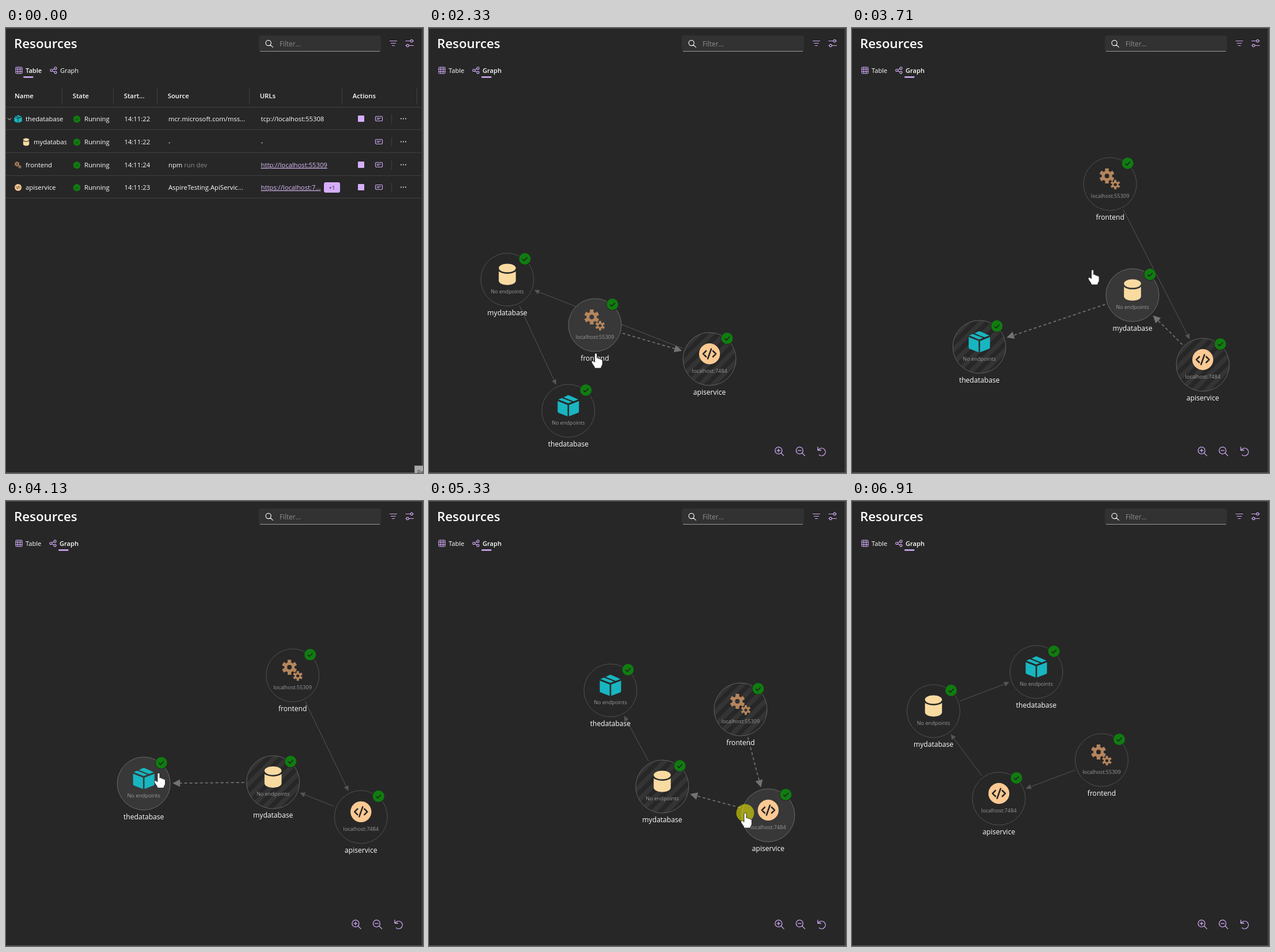
An HTML page that plays this animation: 724 by 773 pixels, repeating every 6.95 s.

```html
<!DOCTYPE html>
<html lang="en">
<head>
<meta charset="utf-8">
<title>Resources</title>
<style>
  html, body { margin: 0; width: 100%; height: 100%; overflow: hidden; background: #272727; }
  svg { display: block; width: 724px; height: 773px; font: 500 11.25px "Open Sans", "Noto Sans", sans-serif; fill: #fff; }
  .head { font-weight: 600; font-size: 11.3px; }
  .title { font-weight: 600; font-size: 22.3px; }
  .tab { font-size: 11.1px; }
  .dim { fill: #8c8c8c; font-weight: 400; }
  .url { fill: #dcbcfa; text-decoration: underline; }
  .ico { fill: none; stroke: #cfa9f5; stroke-width: 1.15; stroke-linecap: round; stroke-linejoin: round; }
  .rule { stroke: #404040; }
  .row { fill: #272727; }
  .row.hover { fill: #2c2c2c; }
  .node text { text-anchor: middle; }
  .node .name { font-size: 12.1px; }
  .node .port { font-size: 9.1px; font-weight: 400; fill: #999; }
  .ring { fill: #272727; stroke: #515151; }
  .near .ring { fill: url(#stripes); stroke: #636363; }
  .hot .ring { fill: #383838; stroke: #6a6a6a; }
  .link path { stroke: #565656; fill: none; }
  .link polygon { fill: #565656; }
  .link.on path { stroke: #737373; stroke-width: 1.7; stroke-dasharray: 5 4; }
  .link.on polygon { fill: #737373; }
</style>
</head>
<body>
<svg id="stage" viewBox="0 0 724 773" xmlns="http://www.w3.org/2000/svg"></svg>
<script>
const LOOP = 6950, SWITCH = 1173;
const ACCENT = '#d5aefb';
const stage = document.getElementById('stage');
const $ = id => document.getElementById(id);

const text = (x, y, s, cls = '', extra = '') => `<text x="${x}" y="${y}" class="${cls}" ${extra}>${s}</text>`;
const icon = (x, y, d, extra = '') => `<path class="ico" transform="translate(${x} ${y})" d="${d}" ${extra}/>`;
const use = (id, x, y, k = 1) => `<use href="#${id}" transform="translate(${x} ${y}) scale(${k})"/>`;
const disc = (x, y, r) => `M${x - r} ${y}a${r} ${r} 0 1 0 ${2 * r} 0a${r} ${r} 0 1 0 ${-2 * r} 0Z`;

function gear(cx, cy, outer, inner, hole) {
  const pts = [], step = Math.PI / 3;
  for (let i = 0; i < 6; i++) {
    for (const [da, r] of [[-.36, inner], [-.24, outer], [.24, outer], [.36, inner]]) {
      const a = i * step + da + .52;
      pts.push((cx + r * Math.cos(a)).toFixed(2) + ' ' + (cy + r * Math.sin(a)).toFixed(2));
    }
  }
  return 'M' + pts.join('L') + 'Z' + disc(cx, cy, hole);
}

const defs = `<defs>
  <pattern id="stripes" width="16" height="16" patternUnits="userSpaceOnUse" patternTransform="rotate(45)">
    <rect width="16" height="16" fill="#272727"/><rect width="8" height="16" fill="#343434"/>
  </pattern>
  <clipPath id="nameCell"><rect x="0" y="180" width="105" height="36"/></clipPath>
  <path id="db" fill="#f9dba1" transform="scale(1.85) translate(-12 -12)" d="M12 10c4.42 0 8-1.8 8-4s-3.58-4-8-4-8 1.8-8 4 3.58 4 8 4Zm6.33.17A6.9 6.9 0 0 0 20 9.05V18c0 2.2-3.58 4-8 4s-8-1.8-8-4V9.05a6.9 6.9 0 0 0 1.67 1.12C7.36 11 9.6 11.5 12 11.5c2.4 0 4.64-.5 6.33-1.33Z"/>
  <g id="box" fill="#18b6c1">
    <path d="M-18.5-8L-1.3-1.2V18.5L-17 12.4Q-18.5 11.8-18.5 10Z"/>
    <path d="M18.5-8L1.3-1.2V18.5L17 12.4Q18.5 11.8 18.5 10Z"/>
    <path d="M-17.5-10.7L-11.2-13.3 6.2-6.4 0-3.9ZM-8.3-14.5L-1.5-17.8Q0-18.6 1.5-17.8L17.5-10.7 9-7.5Z"/>
  </g>
  <path id="gears" fill="#b5855d" fill-rule="evenodd" d="${gear(-5.5, -5, 13.4, 9, 4)}${gear(9, 10, 8.6, 5.6, 2.6)}"/>
  <g id="code">
    <circle r="18.2" fill="#fdc993"/>
    <path d="M-6-5L-11 0L-6 5M6-5L11 0L6 5M3-8.5L-3 8.5" fill="none" stroke="#272727" stroke-width="2.6" stroke-linecap="round" stroke-linejoin="round"/>
  </g>
  <g id="ok">
    <circle r="10" fill="#107c10"/>
    <path d="M-4.2.3L-1.3 3.1L4.3-2.6" fill="none" stroke="#1f1f1f" stroke-width="1.5"/>
  </g>
</defs>`;

const zoom = 'M4.4-1.6a6 6 0 1 0-12 0a6 6 0 1 0 12 0M2.8 2.8L7.6 7.6M-4.4-1.6H1.2';
const header = `
  <rect width="724" height="773" fill="#272727"/>
  ${text(14, 35, 'Resources', 'title')}
  <rect x="439" y="13" width="212" height="28" rx="3.5" fill="#323232"/>
  <path d="M441 40.5H649" stroke="#9c9c9c"/>
  ${icon(457, 27, 'M3.2-1a4.6 4.6 0 1 0-9.2 0a4.6 4.6 0 1 0 9.2 0M2 2.4L6.3 6.4', 'style="stroke:#fff"')}
  ${text(475, 32, 'Filter...', 'dim', 'font-size="11.7"')}
  ${icon(672.5, 26.5, 'M-6-4H6M-4 0H4M-2 4H2')}
  ${icon(700.5, 26.5, 'M-6.5-4H1.5M6-4H7M-6.5 4H-5.5M-1 4H7' + disc(3.7, -4, 2.1) + disc(-3.2, 4, 2.1))}
  ${icon(22.5, 73.5, 'M-4-5.5H4Q5.5-5.5 5.5-4V4Q5.5 5.5 4 5.5H-4Q-5.5 5.5-5.5 4V-4Q-5.5-5.5-4-5.5M-2-5.5V5.5M2-5.5V5.5M-5.5-2H5.5M-5.5 2H5.5')}
  ${text(34, 78, 'Table', 'tab', 'id="tabTable"')}
  <g id="tabGraph">
    ${icon(82.5, 73.5, disc(-3.6, 0, 2) + disc(3.5, -3.6, 2) + disc(3.5, 3.6, 2) + 'M-1.8-.9L1.7-2.7M-1.8.9L1.7 2.7')}
    ${text(94, 78, 'Graph', 'tab')}
  </g>
  <rect id="mark" y="84" width="17.5" height="2.5" rx="1.2" fill="${ACCENT}"/>`;

const rowY = i => Math.round(158 + 39.8 * i);

function row(i, r) {
  const y = rowY(i), b = y + 4, left = r.indent || 34;
  return `<rect class="row" x="0" y="${y - 19}" width="721" height="38"/>
    ${use(r.icon, left - 13, y, r.k)}
    ${text(left, b, r.name, '', r.indent ? 'clip-path="url(#nameCell)"' : '')}
    ${use('ok', 123, y + .3, .62)}${text(136, b, 'Running')}${text(205.5, b, r.start)}
    ${text(282, b, r.source)}${text(442.5, b, r.url, r.link ? 'url' : '')}
    ${r.indent ? '' : `<rect x="611" y="${y - 6}" width="11" height="11" rx="1" fill="${ACCENT}"/>`}
    ${icon(647.5, y - .5, 'M-4.5-4H4.5Q6-4 6-2.6V2.6Q6 4 4.5 4H-4.5Q-6 4-6 2.6V-2.6Q-6-4-4.5-4M-3.4-1H3M-3.4 1H.5')}
    <path class="rule" d="M669.5 ${y - 8}v16M0 ${y + 18.5}H721"/>
    ${[686, 690, 694].map(x => `<circle cx="${x}" cy="${y - .5}" r=".9"/>`).join('')}`;
}

const rows = [
  { icon: 'box', k: .36, name: 'thedatabase', start: '14:11:22', source: 'mcr.microsoft.com/mss...', url: 'tcp://localhost:55308' },
  { icon: 'db', k: .35, name: 'mydatabase', start: '14:11:22', source: '-', url: '-', indent: 48 },
  { icon: 'gears', k: .33, name: 'frontend', start: '14:11:24', source: 'npm <tspan class="dim">run dev</tspan>', url: 'http://localhost:55309', link: true },
  { icon: 'code', k: .33, name: 'apiservice', start: '14:11:23', source: 'AspireTesting.ApiServic...', url: 'https://localhost:7...', link: true }
];
const columns = { Name: 97, State: 186, 'Start...': 262, Source: 422, URLs: 583, Actions: 713 };
const edges = Object.values(columns);
const table = `<g id="table">
  ${Object.keys(columns).map((s, i) => text(i ? edges[i - 1] + 18.7 : 15, 122, s, 'head') +
    `<path class="rule" d="M${edges[i] + .5} 103V133"/>`).join('')}
  <path class="rule" d="M0 137.5H721"/>
  ${rows.map((r, i) => row(i, r)).join('')}
  <path d="M3 156.5L6 159.8L9 156.5" fill="none" stroke="#ddd"/>
  <rect x="552" y="268" width="28" height="18" rx="3" fill="${ACCENT}"/>
  ${text(566, 281, '+1', '', 'text-anchor="middle" font-size="9.5" style="fill:#272727"')}
</g>`;

const nodes = [
  { icon: 'gears', port: 'localhost:55309', name: 'frontend' },
  { icon: 'code', port: 'localhost:7484', name: 'apiservice' },
  { icon: 'db', port: 'No endpoints', name: 'mydatabase' },
  { icon: 'box', port: 'No endpoints', name: 'thedatabase' }
];
// Each node links to the next one in the chain
const links = nodes.slice(1);
const graph = `<g id="graph">
  ${links.map((_, i) => `<g class="link" id="link${i}"><path/><polygon/></g>`).join('')}
  ${nodes.map((n, i) => `<g class="node" id="node${i}">
    <circle class="ring" r="46"/>${use(n.icon, 0, -9)}
    <circle cx="30.5" cy="-36" r="11" fill="#272727"/>${use('ok', 30.5, -36)}
    ${text(0, 24, n.port, 'port')}${text(0, 62, n.name, 'name')}</g>`).join('')}
  ${icon(608.5, 735.5, zoom + 'M-1.6-4.4V1.2', 'style="stroke-width:1.3"')}
  ${icon(645, 735.5, zoom, 'style="stroke-width:1.3"')}
  ${icon(682, 736, 'M-7-8V-2.5H-1.5M-6.7-2.8L-3.4-5.4A6.6 6.6 0 1 1-4.6 5.5', 'style="stroke-width:1.3"')}
</g>`;

const frame = `
  <path d="M0 .5H722" stroke="#505050"/><path d="M722.5 0V773M0 772.5H724" stroke="#5c5c5c"/>
  <g id="tip"><rect x="709.5" y="760.5" width="20" height="20" fill="#a8a8a8" stroke="#8a8a8a"/>
  ${text(714, 775, 'Pe', '', 'font-size="9.5" style="fill:#333"')}</g>`;

const pointer = `<g id="cursor">
  <circle id="press" r="15.5" fill="#ff0" fill-opacity=".52"/>
  <g stroke="#111" stroke-width=".8" stroke-linejoin="round">
    <path id="arrow" d="M0 0V19L4.4 15L7.5 22.5L10.7 21.1L7.6 13.9H13.5Z"/>
    <path id="hand" d="M-2 2C-2-.7 2-.7 2 2V8.5C3 7.5 5.5 8 5.5 10C6.5 9 8.5 9.5 8.7 11C10 10.3 11.5 11.2 11.5 13V18C11.5 22 9 22 9 26H-2C-2 22-7 19-7.5 15C-7.5 12.5-4.5 12.5-2 15.5Z"/>
  </g></g>`;

stage.innerHTML = defs + header + table + graph + frame + pointer;

// Key poses of the chain: time, then x, y of each node
const poses = [
  [1700, 418, 274, 451, 462, 272, 397, 305, 585],
  [2330, 288, 516, 487, 575, 136, 437, 242, 665],
  [2750, 330, 390, 496, 568, 120, 435, 170, 645],
  [3710, 448, 271, 609, 585, 487, 464, 221, 554],
  [4550, 531, 345, 619, 513, 429, 505, 267, 396],
  [4750, 535, 352, 611, 520, 420, 501, 385, 290],
  [5330, 541, 362, 589, 546, 405, 496, 315, 329],
  [5900, 490, 425, 262, 543, 152, 405, 320, 274],
  [6910, 433.5, 450, 255, 517, 141.5, 365, 320, 297]
];
// Turning points of the pointer: time, x, y
const route = [
  [30, 716, 764], [680, 91, 74], [1100, 91, 74], [1240, 134, 174], [1600, 418, 320],
  [2330, 290, 565], [2750, 122, 445], [3560, 490, 432], [3710, 418, 420], [4250, 252, 480],
  [4550, 412, 324], [4750, 412, 296], [5330, 549, 542], [5950, 222, 538], [6640, 682, 758]
];
// Hovered node, pointer enters, button down, button up, pointer leaves
const grabs = [
  [0, 1560, 1640, 2250, 2400], [2, 2570, 2740, 3560, 3800],
  [3, 3990, 4240, 4850, 4950], [1, 5190, 5290, 5960, 6200]
];
const click = [900, 1010];

// Monotone cubic through rows of [time, ...values]
function at(keys, t) {
  const n = keys.length - 1;
  if (t <= keys[0][0]) return keys[0].slice(1);
  if (t >= keys[n][0]) return keys[n].slice(1);
  const i = keys.findIndex(k => k[0] > t) - 1;
  const slope = (j, c) => (keys[j + 1][c] - keys[j][c]) / (keys[j + 1][0] - keys[j][0]);
  const tangent = (j, c) => {
    if (j === 0 || j === n) return 0;
    const a = slope(j - 1, c), b = slope(j, c);
    return a * b <= 0 ? 0 : 2 * a * b / (a + b);
  };
  const h = keys[i + 1][0] - keys[i][0], u = (t - keys[i][0]) / h, v = 1 - u;
  return keys[i].slice(1).map((from, k) => {
    const c = k + 1;
    return v * v * (1 + 2 * u) * from + u * u * (3 - 2 * u) * keys[i + 1][c] +
      h * u * v * (v * tangent(i, c) - u * tangent(i + 1, c));
  });
}

const place = (el, [x, y]) => el.setAttribute('transform', `translate(${x.toFixed(2)} ${y.toFixed(2)})`);
const show = (el, on) => { el.style.display = on ? '' : 'none'; };
const within = (t, a, b) => t >= a && t < b;

function drawLink(el, [ax, ay], [bx, by], on) {
  const d = Math.hypot(bx - ax, by - ay), ux = (bx - ax) / d, uy = (by - ay) / d;
  const size = on ? 13 : 9, half = on ? 6.5 : 4.2;
  const tx = bx - ux * 50, ty = by - uy * 50, ex = tx - ux * size, ey = ty - uy * size;
  el.classList.toggle('on', on);
  el.firstChild.setAttribute('d', `M${ax + ux * 50} ${ay + uy * 50}L${ex} ${ey}`);
  el.lastChild.setAttribute('points', `${tx},${ty} ${ex - uy * half},${ey + ux * half} ${ex + uy * half},${ey - ux * half}`);
}

function drawGraph(t, hot) {
  const flat = at(poses, t);
  const pos = nodes.map((_, i) => flat.slice(2 * i, 2 * i + 2));
  nodes.forEach((_, i) => {
    const state = i === hot ? ' hot' : Math.abs(i - hot) === 1 ? ' near' : '';
    $('node' + i).setAttribute('class', 'node' + state);
    place($('node' + i), pos[i]);
  });
  links.forEach((_, i) => drawLink($('link' + i), pos[i], pos[i + 1], hot === i || hot === i + 1));
}

const rowRects = [...document.querySelectorAll('.row')];

function render(t) {
  const inGraph = t >= SWITCH, cur = at(route, t);
  const grab = grabs.find(g => within(t, g[1], g[4]));
  show($('table'), !inGraph);
  show($('graph'), inGraph);
  show($('tip'), t < 60);

  const p = Math.min(1, Math.max(0, (t - SWITCH) / 200));
  $('mark').setAttribute('x', 30 + 61 * p * p * (3 - 2 * p));
  $('tabTable').style.fontWeight = inGraph ? 400 : 600;
  $('tabGraph').style.fontWeight = inGraph ? 600 : 400;
  place($('tabGraph'), [inGraph ? -1 : 0, 0]);

  if (inGraph) drawGraph(t, grab ? grab[0] : NaN);
  else rowRects.forEach((r, i) => r.classList.toggle('hover', t >= 30 && Math.abs(cur[1] - rowY(i)) < 20));

  const hand = within(t, 640, 1100) || within(t, 1560, 6200);
  show($('cursor'), within(t, 30, 6680));
  show($('press'), within(t, ...click) || !!grab && within(t, grab[2], grab[3]));
  show($('hand'), hand);
  show($('arrow'), !hand);
  place($('cursor'), cur);
}

const start = performance.now();
function tick() {
  render((performance.now() - start) % LOOP);
  requestAnimationFrame(tick);
}
tick();
</script>
</body>
</html>
```
